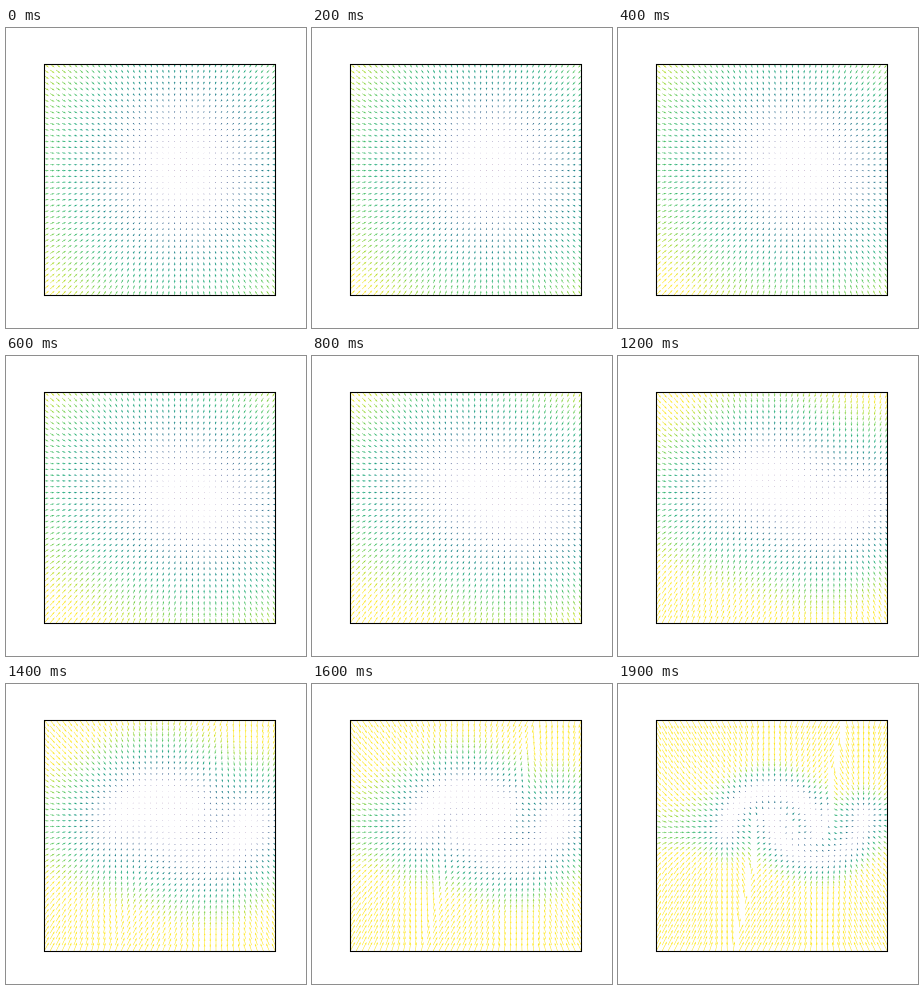
An HTML page with a canvas that plays this animation: 300 by 300 pixels, repeating every 7 s.

```html
<!DOCTYPE html>
<html lang="en">
<head>
<meta charset="utf-8">
<title>Vector field</title>
<style>
  html, body { margin: 0; width: 100%; height: 100%; overflow: hidden; background: #fff; }
  canvas { display: block; width: 300px; height: 300px; }
</style>
</head>
<body>
<canvas id="stage" width="300" height="300"></canvas>
<script>
const ctx = document.getElementById('stage').getContext('2d');

const LOOP = 7000, STEP = 100, LAST = 19;
const BOX = { x: 38.25, y: 36, size: 231 };
const GRID = 40, RANGE = 2.5;
const UNIT = 1.57;      // pixels per unit of speed
const SHAFT = 0.554;    // shaft width in pixels
const TOP_SPEED = 4.07; // speed at the end of the colour scale

const viridis = [
  [68, 1, 84], [71, 45, 123], [59, 82, 139], [44, 114, 142], [33, 145, 140],
  [40, 174, 128], [94, 201, 98], [173, 220, 48], [253, 231, 37]
];

// Two interleaved half circles
const moons = [];
for (let i = 0; i < 60; i++) {
  const a = Math.PI * i / 59;
  moons.push([Math.cos(a), Math.sin(a)], [1 - Math.cos(a), 0.5 - Math.sin(a)]);
}

function color(speed) {
  const p = Math.min(1, speed / TOP_SPEED) * (viridis.length - 1);
  const i = Math.min(viridis.length - 2, Math.floor(p));
  const mix = viridis[i].map((c, k) => Math.round(c + (viridis[i + 1][k] - c) * (p - i)));
  return `rgb(${mix})`;
}

const limit = (v, cap) => v / Math.hypot(1, v / cap);

// Flow from a normal distribution towards the moons
function velocity(x, y, t) {
  const s = 1 - t, k = 0.5 / (s * s);
  const dist = moons.map(([mx, my]) => ((x - t * mx) ** 2 + (y - t * my) ** 2) * k);
  const near = Math.min(...dist);
  let sum = 0, ex = 0, ey = 0;
  moons.forEach(([mx, my], i) => {
    const w = Math.exp(near - dist[i]);
    sum += w;
    ex += w * mx;
    ey += w * my;
  });
  const vx = (ex / sum - x) / s, vy = (ey / sum - y) / s;
  return t ? [limit(vx, 2.8 / t), limit(vy, 5.5 / t)] : [vx, vy];
}

function arrow(px, py, vx, vy) {
  const speed = Math.hypot(vx, vy), len = speed * UNIT;
  ctx.fillStyle = color(speed);
  ctx.beginPath();
  if (len < SHAFT) {
    ctx.arc(px, py, SHAFT / 2, 0, 2 * Math.PI);
  } else {
    const w = SHAFT * Math.min(1, len / (5 * SHAFT));
    const c = vx / speed, s = -vy / speed;
    const at = (a, b) => ctx.lineTo(px + a * c - b * s, py + a * s + b * c);
    const neck = len - 4.5 * w, barb = len - 5 * w;
    at(0, -w / 2);
    at(neck, -w / 2);
    at(barb, -1.5 * w);
    at(len, 0);
    at(barb, 1.5 * w);
    at(neck, w / 2);
    at(0, w / 2);
  }
  ctx.fill();
}

function draw(step) {
  const t = 0.85 * step / LAST;
  ctx.fillStyle = '#fff';
  ctx.fillRect(0, 0, 300, 300);
  ctx.save();
  ctx.beginPath();
  ctx.rect(BOX.x, BOX.y, BOX.size, BOX.size);
  ctx.clip();
  for (let r = 0; r < GRID; r++) {
    for (let c = 0; c < GRID; c++) {
      const u = c / (GRID - 1), v = r / (GRID - 1);
      const [vx, vy] = velocity((2 * u - 1) * RANGE, (1 - 2 * v) * RANGE, t);
      arrow(BOX.x + u * BOX.size, BOX.y + v * BOX.size, vx, vy);
    }
  }
  ctx.restore();
  ctx.strokeStyle = '#000';
  ctx.lineWidth = 1.1;
  ctx.strokeRect(38.5, 36.5, 231, 231);
}

const start = performance.now();
let shown = -1;

function tick() {
  const time = (performance.now() - start) % LOOP;
  const step = Math.min(LAST, Math.floor(time / STEP));
  if (step !== shown) draw(shown = step);
  requestAnimationFrame(tick);
}
tick();
</script>
</body>
</html>
```
